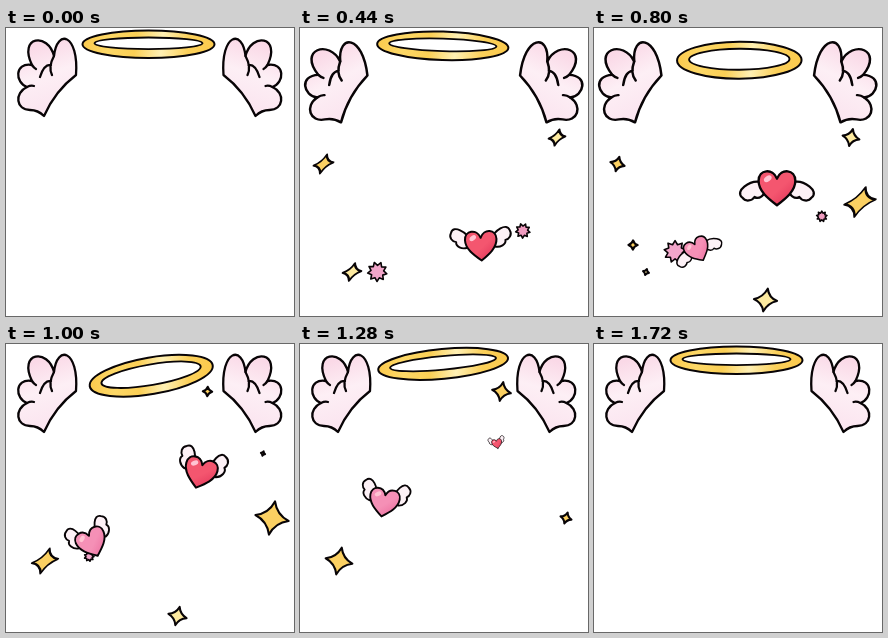
An HTML page with a canvas that plays this animation: 288x288 px, repeating every 1760 ms.

```html
<!DOCTYPE html>
<html lang="en">
<head>
<meta charset="utf-8">
<title>Halo, wings and hearts</title>
<style>
  html, body { margin: 0; width: 100%; height: 100%; overflow: hidden; background: #fff; }
  canvas { display: block; width: 288px; height: 288px; }
</style>
</head>
<body>
<canvas id="stage"></canvas>
<script>
const LOOP = 1760, STEP = 40, INK = '#080406', TAU = 2 * Math.PI;
const canvas = document.getElementById('stage');
const ctx = canvas.getContext('2d');
const ratio = window.devicePixelRatio || 1;
canvas.width = canvas.height = 288 * ratio;

const mix = (a, b, k) => a + (b - a) * k;
const clamp = v => Math.max(0, Math.min(1, v));
const wave = (t, peak, period) => Math.cos(TAU * (t - peak) / period);
const bell = (v, middle, width) => Math.exp(-(((v - middle) / width) ** 2));
const sigmoid = v => 1 / (1 + Math.exp(-v));
// Grows from nothing and shrinks back over an age of 0 to 1.
const swell = (age, power) => age > 0 && age < 1 ? Math.sin(Math.PI * age) ** power : 0;

function gradient(x0, y0, x1, y1, ...colors) {
  const g = ctx.createLinearGradient(x0, y0, x1, y1);
  colors.forEach((c, i) => g.addColorStop(i / (colors.length - 1), c));
  return g;
}

function paint(path, fill, width) {
  ctx.fillStyle = fill;
  ctx.fill(path);
  ctx.lineWidth = width;
  ctx.strokeStyle = INK;
  ctx.stroke(path);
}

function placed(x, y, degrees, sx, sy, draw) {
  ctx.save();
  ctx.translate(x, y);
  ctx.rotate(degrees * Math.PI / 180);
  ctx.scale(sx, sy);
  draw();
  ctx.restore();
}

const WING = new Path2D('M38 88Q49 63 70 47C73 6 51 0 48 28C42 4 12 8 26 37C8 34 9 55 21 59C8 65 10 82 24 82Q32 82 38 88Z');
const FOLDS = new Path2D('M48 28Q42 39 46 47M34 49Q38 36 45 37M26 37Q28 40 30 41M21 59Q25 57 28 58');

function wing(t) {
  const flap = wave(t, 140, 320) * clamp(t / 80) * clamp((920 - t) / 120);
  placed(71, 60, -12 * flap, 1 + .1 * flap, 1, () => {
    ctx.translate(-71, -60);
    paint(WING, gradient(28, 18, 46, 76, '#fad9e7', '#fdeff5', '#fbe6f0'), 2.3);
    ctx.lineWidth = 2.3;
    ctx.stroke(FOLDS);
  });
}

function halo(t) {
  const u = Math.max(-1, Math.min(1, (t - 890) / 560));
  const dip = (1 + Math.cos(Math.PI * u)) / 2;
  const rx = 66 - 4 * dip, ry = 13.8 + 5 * dip;
  placed(142.5 + 3 * dip, 16.3 + 17 * dip, dip * (-5 - 29 * u), 1, 1, () => {
    const outer = new Path2D(), hole = new Path2D();
    outer.ellipse(0, 0, rx, ry, 0, 0, TAU);
    hole.ellipse(0, -1, rx - 12, ry - 8, 0, 0, TAU);
    paint(outer, gradient(-rx, -8, rx, 8, '#fbc94c', '#fdd867', '#fbcf55', '#fff0b4', '#fbd05a', '#fbc94c'), 2);
    paint(hole, '#fff', 1.8);
  });
}

const HEART = new Path2D('M0 17C-9 10-18 3-18-7C-18-18-4-20 0-9C4-20 18-18 18-7C18 3 9 10 0 17Z');
const WINGLET = new Path2D('M0-4C-6-12-24-15-23-5C-24 1-18 4-14 3C-13 8-5 9 0 5Z');
const HEARTS = [
  { color: '#f4566f', shade: '#e73f60', birth: 160, size: 1.03, x: [181, 197], y: [246, 98], turn: .66, sway: 16, spin: 0 },
  { color: '#f590b6', shade: '#ee76a4', birth: 560, size: .86, x: [111, 84], y: [239, 121], turn: .26, sway: -16, spin: -129 }
];

function heart({ color, shade, birth, size, x, y, turn, sway, spin }, t) {
  const age = (t - birth) / 1140;
  const scale = size * swell(age, .45);
  if (!scale) return;
  const tilt = sway * wave(t, 230, 760) + spin * Math.exp((birth - t) * .0064);
  const lift = wave(t, 600, 400 / 3);
  const left = mix(...x, sigmoid((age - turn) * 20));
  const top = mix(...y, age) + 8 * Math.sin(TAU * age);
  placed(left, top, tilt, scale, scale, () => {
    for (const side of [1, -1]) placed(0, 0, 0, side, 1, () =>
      placed(-14, -3, 6 + 50 * lift, 1, 1, () => paint(WINGLET, '#fdf1f6', 2.2)));
    paint(HEART, gradient(-8, -8, 10, 12, color, color, shade), 2.3);
    placed(-9, -9, -35, 1, 1, () => {
      ctx.fillStyle = '#ffc3d2';
      ctx.beginPath();
      ctx.ellipse(0, 0, 4.2, 2.6, 0, 0, TAU);
      ctx.fill();
    });
  });
}

const GOLD = '#fbd062', CREAM = '#fdeaa0';
const STARS = [
  { x: 23.5, y: 136, size: 24, birth: 220, life: 720, color: GOLD },
  { x: 52, y: 244, size: 21, birth: 200, life: 650, color: CREAM },
  { x: 257, y: 109.5, size: 22, birth: 220, life: 820, color: CREAM },
  { x: 266, y: 174, size: 36, birth: 540, life: 800, color: GOLD },
  { x: 171.5, y: 272, size: 25, birth: 500, life: 680, color: CREAM },
  { x: 39, y: 217, size: 31, birth: 740, life: 840, color: GOLD },
  { x: 201.5, y: 47.5, size: 21, birth: 920, life: 620, color: GOLD }
];
const BURSTS = [
  { x: [75, 84], y: [256, 208], size: 26, birth: 220, life: 860, color: '#f2a6ca' },
  { x: [219, 230], y: [214, 182], size: 17, birth: 160, life: 800, color: '#f09cc0' }
];

function star({ x, y, size, birth, life, color }, t) {
  const age = (t - birth) / life;
  const r = size * swell(age, .7) / 2 - .8;
  if (r < 1) return;
  const path = new Path2D();
  path.moveTo(r, 0);
  for (let i = 0; i < 4; i++) {
    const mid = (i + .5) * TAU / 4, end = (i + 1) * TAU / 4, waist = r * .34;
    path.quadraticCurveTo(waist * Math.cos(mid), waist * Math.sin(mid), r * Math.cos(end), r * Math.sin(end));
  }
  path.closePath();
  const smear = -.26 * bell(age, .32, .1);
  placed(x, y, 18 * age, 1, 1, () => {
    ctx.transform(1, smear, smear, 1, 0, 0);
    paint(path, color, 2.1);
  });
}

function burst({ x, y, size, birth, life, color }, t) {
  const age = (t - birth) / life;
  const r = size * swell(age, .7) / 2 - .6;
  if (r < 1) return;
  const path = new Path2D();
  for (let i = 0; i < 18; i++) {
    const reach = i % 2 ? r * .66 : r, a = i * TAU / 18;
    path.lineTo(reach * Math.sin(a), -reach * Math.cos(a));
  }
  path.closePath();
  placed(mix(...x, age), mix(...y, age), t * .05, 1, 1, () => paint(path, color, 1.6));
}

function draw(now) {
  const t = Math.floor(now % LOOP / STEP) * STEP;
  ctx.setTransform(ratio, 0, 0, ratio, 0, 0);
  ctx.fillStyle = '#fff';
  ctx.fillRect(0, 0, 288, 288);
  ctx.lineJoin = ctx.lineCap = 'round';
  wing(t);
  placed(287.5, 0, 0, -1, 1, () => wing(t));
  halo(t);
  BURSTS.forEach(b => burst(b, t));
  STARS.forEach(s => star(s, t));
  HEARTS.forEach(h => heart(h, t));
}

const start = performance.now();
function tick() {
  draw(performance.now() - start);
  requestAnimationFrame(tick);
}
tick();
</script>
</body>
</html>
```
